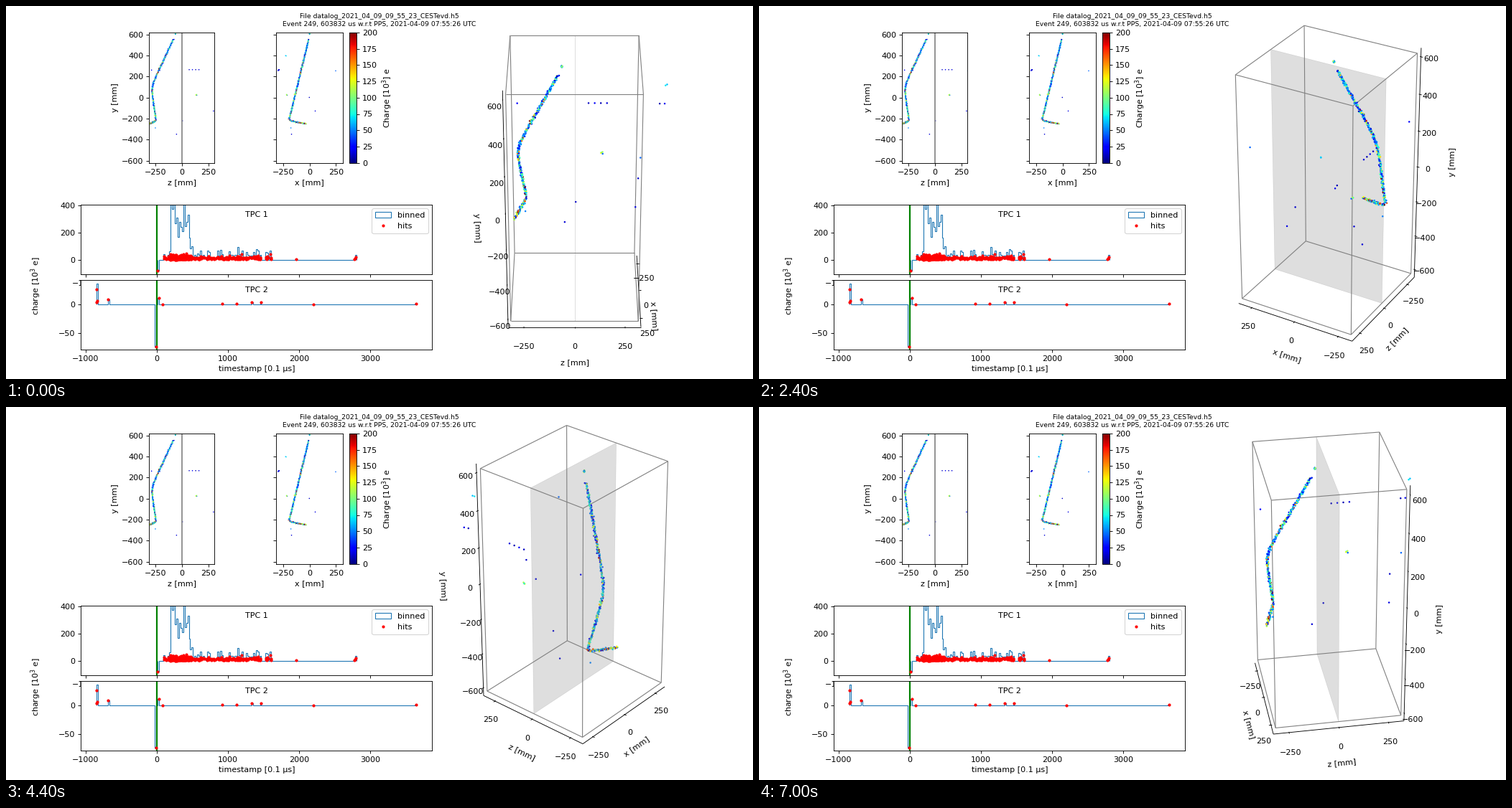
A matplotlib script for the animation above (7.2 s loop, 1040x520 px).

```python
import numpy as np
import matplotlib.pyplot as plt
from matplotlib.animation import FuncAnimation
from matplotlib.collections import LineCollection
from matplotlib.patches import Polygon

W, H, DPI = 1040, 520, 80
FRAMES, INTERVAL = 36, 200
rng = np.random.default_rng(249)

fig = plt.figure(figsize=(W / DPI, H / DPI), dpi=DPI, facecolor="white")


def panel(left, top, right, bottom):
    """Axes whose border lies on the given pixels, from the top left corner."""
    snap = 0.25  # keeps the border clear of the rounding limit
    return fig.add_axes([(left + snap) / W, (H - bottom - 1 + snap) / H,
                         (right - left) / W, (bottom - top) / H])


# ---- event data, columns x, z, y in mm ----
def make_track():
    y = np.linspace(555, -203, 360)
    x = -193 + 0.243 * (y + 203)
    upper, lower = -337 + 0.463 * y, -275 - 0.147 * y
    bend = 19
    z = bend * np.logaddexp(upper / bend, lower / bend)
    u = np.linspace(0, 1, 80)
    hook = np.c_[-193 + 157 * u, -245 - 57 * u, -203 - 44 * u ** 0.45]
    track = np.vstack([np.c_[x, z, y], hook])
    return track + rng.normal(0, 2.8, track.shape)


def make_event():
    track = make_track()
    charge = rng.gamma(2.2, 27, len(track)) + 8
    charge[track[:, 2] < -100] *= 1.35

    clusters = np.repeat([(-2, -58, 606), (-214, 139, 26), (-230, 451, 396)],
                         (7, 4, 2), axis=0)
    clusters = clusters + rng.normal(0, 3.5, clusters.shape)
    row = [(-290, z, 266) for z in np.linspace(70, 162, 4)]
    single = [(-296, -286, 262), (-296, 425, 260), (-300, 450, 258),
              (-3, 313, 2), (53, 300, -127), (-155, 6, -220),
              (-172, -50, -348)]
    bright = [(247, 311, 255), (-178, -250, -288)]
    weak = np.array(row + single)
    points = np.vstack([track, clusters, weak, bright])
    return points, np.r_[charge, rng.uniform(30, 130, len(clusters)),
                         rng.uniform(8, 24, len(weak)), 45, 50]


points, charge = make_event()
cmap = plt.get_cmap("jet")
colors = cmap(np.clip(charge / 200, 0, 1))

fig.suptitle("File datalog_2021_04_09_09_55_23_CESTevd.h5\n"
             "Event 249, 603832 us w.r.t PPS, 2021-04-09 07:55:26 UTC",
             fontsize="small")


# ---- flat projections ----
def flat_view(ax, column, half, name):
    dots = ax.scatter(points[:, column], points[:, 2], c=charge, cmap=cmap,
                      vmin=0, vmax=200, s=2, linewidths=0)
    ax.set(xlim=(-half, half), ylim=(-620.76, 620.76), xlabel=name + " [mm]",
           xticks=(-250, 0, 250), yticks=range(-600, 601, 200))
    return dots


ax_zy = panel(199, 36, 290, 218)
flat_view(ax_zy, 1, 309, "z")
ax_zy.axvline(0, color="gray")
ax_zy.set_ylabel("y [mm]")
ax_xy = panel(376, 36, 469, 218)
shown = flat_view(ax_xy, 0, 317, "x")
ax_xy.set_yticklabels([])
bar = fig.colorbar(shown, cax=panel(478, 36, 488, 218),
                   ticks=range(0, 201, 25))
bar.set_label("Charge [$10^3$] e")


# ---- charge against time ----
def time_view(ax, hits, ylim, yticks, title):
    times, sizes = np.transpose(hits)
    edges = np.arange(times.min(), times.max() + 20, 20)
    ax.hist(times, edges, weights=sizes, histtype="step", label="binned")
    ax.axvline(0, color="green", lw=2)
    ax.plot(times, sizes, "r.", ms=5.5, label="hits")
    ax.set(xlim=(-1066, 3874), ylim=ylim, yticks=yticks,
           xticks=range(-1000, 3001, 1000))
    ax.text(0.5, 0.855, title, transform=ax.transAxes,
            ha="center", va="center")


def first_chamber():
    burst = 192 + 273 * rng.random(235) ** 1.2
    tail = rng.uniform(80, 1460, 180)
    late = rng.uniform(1540, 1610, 10)
    times = np.r_[burst, tail, late]
    sizes = 3 + np.minimum(rng.gamma(2.5, 5, len(times)), 45)
    single = [(12, -75), (1960, 5), (2780, 8), (2795, 12), (2805, 25)]
    return np.vstack([np.c_[times, sizes], single])


second_chamber = [(-848, 26), (-848, 4), (-838, 7), (-685, 9), (-9, -73),
                  (30, 11), (80, 0), (920, 2), (1120, 2), (1335, 4),
                  (1465, 4), (2205, 0), (3645, 2)]

ax_one = panel(104, 276, 593, 373)
time_view(ax_one, first_chamber(), (-101, 404), (0, 200, 400), "TPC 1")
ax_one.legend(loc="upper right")
ax_two = panel(104, 381, 593, 478)
time_view(ax_two, second_chamber, (-78, 43), (-50, 0), "TPC 2")
ax_two.set_xlabel("timestamp [0.1 µs]")
fig.text(41.5 / W, 1 - 390.5 / H, "charge [$10^3$ e]", rotation=90,
         ha="center", va="center")

# ---- rotating view, in coordinates where the box spans -1 to 1 ----
HALF = np.array([315, 315, 620.76])
BOX = 0.37345 * np.array([1, 1, 2])
CENTER, SCALE, DISTANCE, ELEV = (791.5, 241.2), 2389, 10, np.radians(30)
EDGE = 1 + 1 / 24              # axes stand slightly outside the box
TICK_PAD = 0.116
NAMES, NAME_PADS = ("x [mm]", "z [mm]", "y [mm]"), (0.252, 0.252, 0.41)
TICKS = ((-250, 0, 250), (-250, 0, 250), range(-600, 601, 200))
FLIP = (1, 0, 0)               # direction in which each axis moves to the front


def project(p, azim):
    """Pixel positions and depth towards the viewer."""
    x, z, y = np.moveaxis(np.asarray(p) * BOX, -1, 0)
    right = z * np.cos(azim) - x * np.sin(azim)
    front = x * np.cos(azim) + z * np.sin(azim)
    up = y * np.cos(ELEV) - front * np.sin(ELEV)
    depth = front * np.cos(ELEV) + y * np.sin(ELEV)
    zoom = SCALE / (DISTANCE - depth)
    xy = np.stack([CENTER[0] + right * zoom, CENTER[1] - up * zoom], axis=-1)
    return xy, depth


def box_edges():
    return np.array([[np.insert([a, b], k, end) for end in (-1, 1)]
                     for k in range(3) for a in (-1, 1) for b in (-1, 1)])


EDGES = box_edges()
PLANE = np.array([(-1, 0, -1), (1, 0, -1), (1, 0, 1), (-1, 0, 1)])
normed = points / HALF

ax3 = fig.add_axes([0, 0, 1, 1])
ax3.set(xlim=(0, W), ylim=(H, 0))
ax3.axis("off")
frame_lines = LineCollection([], colors="gray", linewidths=1, zorder=2)
axis_lines = LineCollection([], colors="black", linewidths=0.8, zorder=1)
ax3.add_collection(frame_lines, autolim=False)
ax3.add_collection(axis_lines, autolim=False)
plane = ax3.add_patch(Polygon(np.zeros((4, 2)), facecolor="gray",
                              edgecolor="gray", alpha=0.26, lw=0.5))
dots = ax3.scatter(np.zeros(len(points)), np.zeros(len(points)), s=5,
                   linewidths=0, zorder=4)
tick_texts = [[ax3.text(0, 0, str(v).replace("-", "−"), ha="center", va="top")
               for v in row] for row in TICKS]
name_texts = [ax3.text(0, 0, name, ha="center", va="center")
              for name in NAMES]


def at(base, k, value):
    p = np.array(base, float)
    p[k] = value
    return p


def draw_axis(k, near, azim):
    base = -near
    base[FLIP[k]] *= -1
    line = project([at(base * EDGE, k, -EDGE), at(base * EDGE, k, EDGE)],
                   azim)[0]
    segments = [line]
    for value, text in zip(TICKS[k], tick_texts[k]):
        place = value / HALF[k]
        root = at(base * EDGE, k, place)
        side = base[FLIP[k]]
        ends = [at(root, FLIP[k], side * (EDGE + d)) for d in (-1 / 60, 1 / 30)]
        segments.append(project(ends, azim)[0])
        text.set_position(
            project(at(base * (EDGE + TICK_PAD), k, place), azim)[0])
    dx, dy = line[1] - line[0]
    angle = np.degrees(np.arctan2(-dy, dx)) % 180
    name_texts[k].set_rotation(angle - 180 if angle > 90 else angle)
    name_texts[k].set_position(
        project(at(base * (EDGE + NAME_PADS[k]), k, 0), azim)[0])
    return segments


def draw(i):
    azim = np.radians(360 * i / FRAMES)
    near = np.array([1 if np.cos(azim) >= 0 else -1,
                     1 if np.sin(azim) >= 0 else -1, 1])
    axis_lines.set_segments(
        [seg for k in range(3) for seg in draw_axis(k, near, azim)])
    frame_lines.set_segments(list(project(EDGES, azim)[0]))

    corners, plane_depth = project(PLANE, azim)
    plane.set_xy(corners)
    xy, depth = project(normed, azim)
    order = np.argsort(depth)
    dots.set_offsets(xy[order])
    dots.set_facecolors(colors[order])
    # whichever reaches closer to the viewer is painted last
    plane.set_zorder(5 if plane_depth.max() > depth.max() else 3)
    return []


anim = FuncAnimation(fig, draw, frames=FRAMES, interval=INTERVAL,
                     init_func=lambda: draw(0), repeat=True, blit=False)
plt.show()
```
